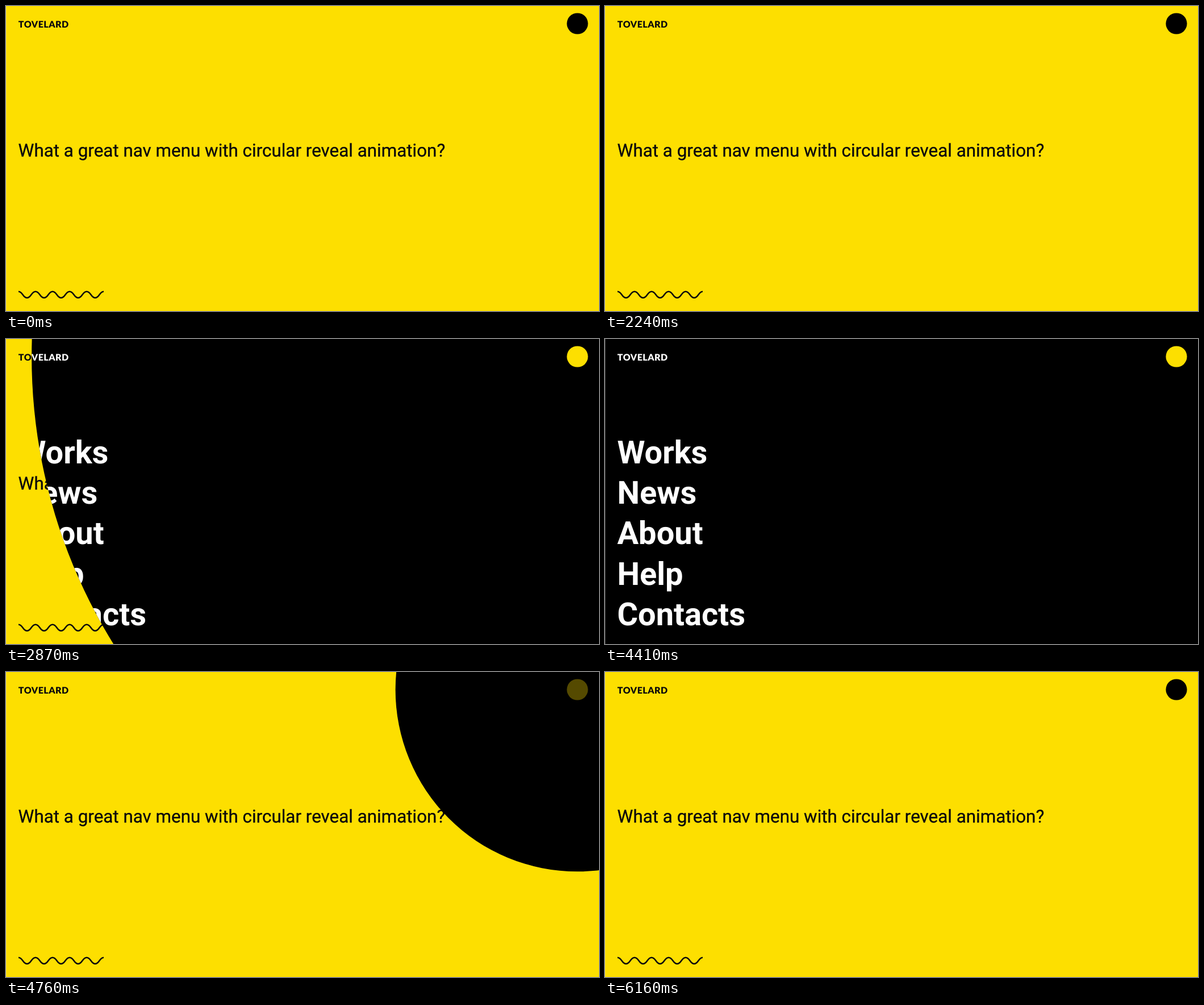
An HTML page for the animation above (6.3 s loop, 1044 px wide and 537 px high).

```html
<!DOCTYPE html>
<html lang="en">
<head>
<meta charset="utf-8">
<title>Circular reveal menu</title>
<style>
  html, body { margin: 0; width: 100%; height: 100%; overflow: hidden; background: #fddf00; }
  svg { display: block; width: 100%; height: 100%; }
  text { font-family: Roboto, sans-serif; text-rendering: geometricPrecision; }
  .logo { font: 900 16px Lato, sans-serif; letter-spacing: .5px; }
  .title { font-size: 31.38px; stroke: #08070c; stroke-width: .3; }
  .items { font-size: 56px; font-weight: 700; }
  .page { fill: #08070c; }
  .menu { fill: #fff; }
  .wave { fill: none; stroke: #08070c; stroke-width: 2.5; }
</style>
</head>
<body>
<svg viewBox="0 0 1044 537">
  <defs>
    <clipPath id="reveal"><circle id="hole" cx="1006" cy="31" r="0"/></clipPath>
  </defs>
  <g class="page">
    <rect width="1044" height="537" fill="#fddf00"/>
    <text class="logo" x="21.7" y="37.8">TOVELARD</text>
    <text class="title" x="21.6" y="265.2">What a great nav menu with circular reveal animation?</text>
    <path class="wave" id="wave"/>
  </g>
  <g class="menu" clip-path="url(#reveal)">
    <rect width="1044" height="537" fill="#000"/>
    <text class="logo" x="21.7" y="37.8">TOVELARD</text>
    <g class="items" id="items"></g>
  </g>
  <rect width="1" height="537" fill="#fff" opacity=".25"/>
  <circle id="dot" cx="1006" cy="31" r="18.6"/>
</svg>
<script>
const LOOP = 6300;
const FULL = 1149;
const OPEN = { start: 2270, duration: 1327 };
const CLOSE = { start: 4481.3, decay: 219 };
const FADE = 420;
const YELLOW = [253, 223, 0];

const byId = id => document.getElementById(id);
const clamp = v => Math.min(1, Math.max(0, v));

byId('wave').setAttribute('d',
  'M22 502.7' + 'c7.5 0 7.5 11 15 11s7.5 -11 15 -11'.repeat(5));

['Works', 'News', 'About', 'Help', 'Contacts'].forEach((label, i) => {
  const item = document.createElementNS('http://www.w3.org/2000/svg', 'text');
  item.setAttribute('x', 21.4);
  item.setAttribute('y', 218.7 + 71.3 * i);
  item.textContent = label;
  byId('items').append(item);
});

function radius(t) {
  if (t >= CLOSE.start) return FULL * Math.exp((CLOSE.start - t) / CLOSE.decay);
  const p = clamp((t - OPEN.start) / OPEN.duration);
  return FULL * (1 - (1 - p) ** 3);
}

function glow(t) {
  return clamp((t - OPEN.start) / FADE) - clamp((t - CLOSE.start) / FADE);
}

function draw(now) {
  const t = now % LOOP;
  byId('hole').setAttribute('r', radius(t));
  byId('dot').setAttribute('fill', `rgb(${YELLOW.map(c => Math.round(c * glow(t)))})`);
}

const begin = performance.now();
function tick() {
  draw(performance.now() - begin);
  requestAnimationFrame(tick);
}
tick();
</script>
</body>
</html>
```
